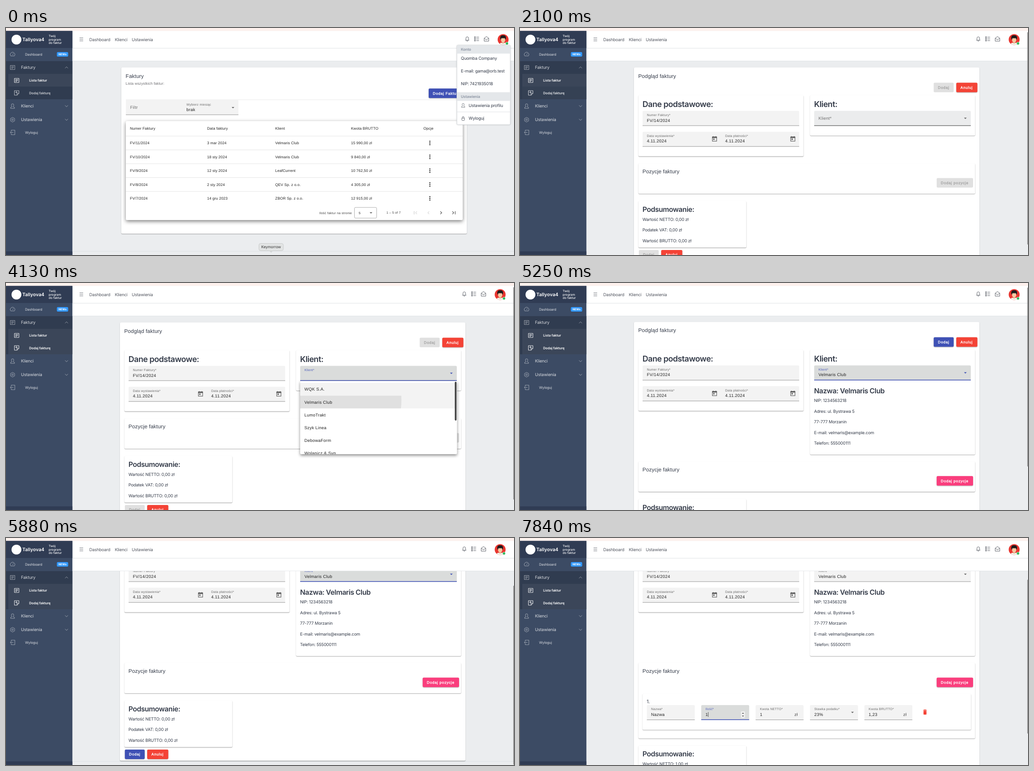
Animation, 1119 px wide and 500 px high, one loop 8 s. Source, as an HTML page with a canvas:

```html
<!DOCTYPE html>
<html lang="pl">
<head>
<meta charset="utf-8">
<title>Faktury</title>
<style>
html, body { margin: 0; width: 100%; height: 100%; overflow: hidden; background: #ebedef; }
canvas { display: block; width: 1119px; height: 500px; }
</style>
</head>
<body>
<canvas id="stage"></canvas>
<script>
const W = 1119, H = 500, LOOP = 8000;
const SIDE = 146.25, TOP = 6.5;
const canvas = document.getElementById('stage');
const c = canvas.getContext('2d');
const dpr = window.devicePixelRatio || 1;
canvas.width = W * dpr;
canvas.height = H * dpr;

const UI = "Inter, 'Noto Sans', sans-serif";
const MAT = "'Liberation Sans', Arial, sans-serif";
const BLUE = '#3f51b5', RED = '#f44336', PINK = '#fa3e7d';
const INK = '#343b49', DARK = '#212121', GREY = '#6a6a6a';

// weight, size, tracking in em, family, extra stroke
const STYLES = {
  body: [400, 9.3, -.02, UI],
  side: [400, 7.6, -.02, UI],
  sub: [600, 7.4, -.01, UI],
  slogan: [500, 6.7, 0, UI],
  brand: [600, 10.4, 0, UI],
  badge: [700, 6, 0, UI],
  menu: [600, 8.2, -.02, UI],
  tip: [400, 8.2, -.01, UI],
  h2: [600, 17.7, -.028, UI],
  h3: [600, 15.5, -.028, UI],
  title: [400, 11.7, .0125, MAT],
  caption: [400, 8.19, .007, MAT],
  cell: [400, 8.19, .018, MAT],
  page: [400, 7.02, .033, MAT],
  input: [400, 9.36, .031, MAT],
  label: [400, 7.02, .031, MAT],
  button: [400, 8.19, .089, MAT, .35]
};

const ICONS = {
  gauge: 'M-4 3.5A5 5 0 1 1 4 3.5ZM0 1L2 -2',
  doc: 'M-5 -4.5H5V4.5H-5ZM-3 -2H3M-3 0H3M-3 2H1',
  note: 'M-5 -5H5V1L1 5H-5ZM5 1H1V5M-3 -1.5H2M-.5 -4V1',
  user: 'M-2.6 -2.5A2.6 2.6 0 0 1 2.6 -2.5Q2.6 0 1.3 1.2L4.3 3V5H-4.3V3L-1.3 1.2Q-2.6 0 -2.6 -2.5Z',
  gear: 'M0 -5.2L4.5 -2.6V2.6L0 5.2L-4.5 2.6V-2.6ZM1.8 0A1.8 1.8 0 1 1 -1.8 0A1.8 1.8 0 1 1 1.8 0',
  exit: 'M-3 -2.5V-5H5V5H-3V2.5M2 0H-5M-3 -2L-5 0L-3 2',
  bell: 'M-4 3H4L2.9 1.4V-1.6A2.9 2.9 0 0 0 -2.9 -1.6V1.4ZM-1.4 3.4A1.4 1.7 0 0 0 1.4 3.4',
  list: 'M-1 -3.8H5M-1 0H5M-1 3.8H5M-5 -4.8h2v2h-2zM-5 -1h2v2h-2zM-5 2.8h2v2h-2z',
  mail: 'M-5 -1.5L0 -5.3L5 -1.5V5H-5ZM-5 -1.5L0 2L5 -1.5',
  lock: 'M-2.9 -.8H2.9V3Q2.9 4.4 1.5 4.4H-1.5Q-2.9 4.4 -2.9 3ZM-1.8 -.8V-2.6A1.8 1.8 0 0 1 1.8 -2.6V-.8',
  up: 'M-3.2 1.6L0 -1.6L3.2 1.6',
  down: 'M-3.2 -1.6L0 1.6L3.2 -1.6',
  burger: 'M-4 -3.4H4M-4 0H4M-4 3.4H4',
  next: 'M-1.7 -3L1.3 0L-1.7 3',
  prev: 'M1.7 -3L-1.3 0L1.7 3',
  last: 'M-3.2 -3L-.2 0L-3.2 3M3 -3.6V3.6',
  first: 'M3.2 -3L.2 0L3.2 3M-3 -3.6V3.6'
};

const clamp = v => Math.min(1, Math.max(0, v));
const ramp = (t, from, len) => clamp((t - from) / len);
const mix = (a, b, p) => a + (b - a) * p;
const smoother = p => p * p * p * (p * (6 * p - 15) + 10);

function text(s, x, y, style, color = INK, align = 'left', size) {
  const [weight, base, track, family, stroke] = STYLES[style];
  const px = size || base;
  c.font = `${weight} ${px}px ${family}`;
  c.letterSpacing = px * track + 'px';
  c.textAlign = align;
  c.fillStyle = color;
  c.fillText(s, x, y);
  if (stroke) {
    c.strokeStyle = color;
    c.lineWidth = stroke;
    c.strokeText(s, x, y);
  }
}

function rect(x, y, w, h, color) {
  c.fillStyle = color;
  c.fillRect(x, y, w, h);
}

function round(x, y, w, h, r, color, border) {
  c.beginPath();
  c.roundRect(x, y, w, h, r);
  if (color) { c.fillStyle = color; c.fill(); }
  if (border) { c.strokeStyle = border; c.lineWidth = .8; c.stroke(); }
}

function disc(x, y, r, color) {
  c.fillStyle = color;
  c.beginPath();
  c.arc(x, y, r, 0, 7);
  c.fill();
}

function clip(x, y, w, h, draw) {
  c.save();
  c.beginPath();
  c.rect(x, y, w, h);
  c.clip();
  draw();
  c.restore();
}

function icon(name, x, y, color, lw = .9, scale = 1) {
  c.save();
  c.translate(x, y);
  c.scale(scale, scale);
  c.strokeStyle = color;
  c.lineWidth = lw;
  c.stroke(new Path2D(ICONS[name]));
  c.restore();
}

function arrow(x, y, color = '#666', s = 1) {
  c.fillStyle = color;
  c.beginPath();
  c.moveTo(x - 3 * Math.abs(s), y - 1.5 * s);
  c.lineTo(x + 3 * Math.abs(s), y - 1.5 * s);
  c.lineTo(x, y + 1.5 * s);
  c.fill();
}

function card(x, y, right, bottom, blur = 1.6, drop = 1.1, alpha = .34) {
  c.save();
  c.shadowColor = `rgba(0,0,0,${alpha})`;
  c.shadowBlur = blur * dpr;
  c.shadowOffsetY = drop * dpr;
  round(x, y, right - x, bottom - y, 2.5, '#fff');
  c.restore();
}

function button(label, x, y, w, color) {
  if (color) {
    c.save();
    c.shadowColor = 'rgba(0,0,0,.3)';
    c.shadowBlur = 2 * dpr;
    c.shadowOffsetY = 1 * dpr;
    round(x, y, w, 21, 2.3, color);
    c.restore();
  } else {
    round(x, y, w, 21, 2.3, '#e0e0e0');
  }
  text(label, x + 9.3, y + 13.4, 'button', color ? '#fff' : '#a3a3a3');
}

// state: 0 idle, 1 hover, 2 focus; lift floats the label
function field(x, y, w, label, value = '', state = 0, lift = 1) {
  round(x, y, w, 33, [2.3, 2.3, 0, 0], ['#f3f3f3', '#ebeced', '#dadcdb'][state]);
  const line = state === 2 ? 1.5 : .9;
  rect(x, y + 33 - line, w, line, ['#8c8c8c', '#303030', BLUE][state]);
  text(label, x + 9.4, y + mix(19.5, 11.4, lift), 'label',
    state === 2 ? '#4f5fba' : GREY, 'left', mix(9.36, 7.02, lift));
  text(value, x + 9.4, y + 24, 'input', DARK);
}

function calendar(x, y) {
  c.strokeStyle = '#5c5c5c';
  c.lineWidth = 1.15;
  c.strokeRect(x - 4.7, y - 4.7, 9.4, 9.4);
  rect(x - 5.2, y - 5.2, 10.4, 2.9, '#5c5c5c');
  rect(x - 3.5, y - 6.4, 1.2, 1.4, '#5c5c5c');
  rect(x + 2.3, y - 6.4, 1.2, 1.4, '#5c5c5c');
  rect(x - 2.9, y - 1.1, 2.9, 2.9, '#5c5c5c');
}

function sidebar(t) {
  const soft = 'rgba(255,255,255,.8)', faint = 'rgba(255,255,255,.55)';
  const active = ramp(t, 1960, 300);
  rect(0, TOP, SIDE, H - TOP, '#3c4b64');
  rect(0, TOP, SIDE, 44 - TOP, '#303c54');
  rect(0, 73, SIDE, 84, '#303c50');
  rect(5, 101, SIDE - 5, 28, 'rgba(255,255,255,.05)');
  rect(5, 129, SIDE - 5, 28, `rgba(255,255,255,${.05 * active})`);
  rect(0, 492, SIDE, 8, '#303c54');

  disc(23, 25.5, 10.8, '#fff');
  text('Tallyova4', 36, 29, 'brand', '#fff');
  ['Twój', 'program', 'do faktur'].forEach((s, i) => text(s, 94, 19.7 + i * 7.8, 'slogan', '#fff'));

  icon('gauge', 14.5, 58, faint);
  text('Dashboard', 42, 60.7, 'side', soft);
  round(112, 53, 25, 10, 2.5, '#39f');
  text('NEWs', 124.5, 60.1, 'badge', '#fff', 'center');

  const groups = [['Faktury', 87, 'doc', 'up'], ['Klienci', 172, 'user', 'down'], ['Ustawienia', 202, 'gear', 'down']];
  for (const [name, y, sign, chevron] of groups) {
    icon(sign, 14.5, y, faint);
    text(name, 33, y + 3.4, 'body', soft);
    icon(chevron, 133.3, y, faint);
  }
  icon('doc', 23.5, 115.5, '#fff');
  text('Lista faktur', 51, 118, 'sub', '#fff');
  const glow = `rgba(255,255,255,${mix(.75, 1, active)})`;
  icon('note', 23.5, 143, glow);
  text('Dodaj fakturę', 51, 145.7, 'sub', glow);
  icon('exit', 14.5, 230, faint);
  text('Wyloguj', 42, 233, 'side', soft);
}

function avatar(x, y) {
  disc(x, y, 12, '#e8352f');
  c.save();
  c.beginPath();
  c.arc(x, y, 12, 0, 7);
  c.clip();
  round(x - 7.5, y + 7, 15, 8, 4, '#f3f1ea');
  rect(x - 2, y + 3, 4, 5.5, '#e5b48c');
  round(x - 6.5, y - 9.5, 13, 11, 5, '#1f1a1c');
  round(x - 4.6, y - 4.5, 9.2, 10.5, 4.4, '#f4c9a2');
  round(x - 5, y - 7, 10, 4, 2, '#1f1a1c');
  c.restore();
  disc(x + 8.5, y + 8.5, 3.2, '#fff');
  disc(x + 8.5, y + 8.5, 2.7, '#2eb85c');
}

function header(shift) {
  rect(0, 0, W, TOP, '#fef1ed');
  rect(SIDE, TOP, W - SIDE, 73 - TOP, '#fff');
  rect(SIDE, 44, W - SIDE, .8, '#d8dbe0');
  rect(SIDE, 72.4, W - SIDE, .8, '#d8dbe0');
  icon('burger', 166, 25, '#5b6069', .8);
  text('Dashboard', 183.5, 28.8, 'body', '#50545e');
  text('Klienci', 239.7, 28.8, 'body', '#50545e');
  text('Ustawienia', 277, 28.8, 'body', '#50545e');
  icon('bell', 1016 + shift, 24, '#4d525b');
  icon('list', 1037 + shift, 24, '#4d525b');
  icon('mail', 1058.3 + shift, 24, '#4d525b');
  avatar(1095 + shift, 25.5);
}

function accountMenu() {
  c.save();
  c.shadowColor = 'rgba(0,0,0,.15)';
  c.shadowBlur = 3 * dpr;
  round(993, 38, 118, 175, 2.5, '#fff', '#cfd3d8');
  c.restore();
  rect(993.4, 38.4, 117.2, 18, '#e4e7ea');
  rect(993.4, 141.5, 117.2, 19, '#e4e7ea');
  text('Konto', 1002, 50, 'menu', '#8a93a2');
  text('Quomba Company', 1002, 69.8, 'body');
  text('E-mail: gama@orb.test', 1002, 98.2, 'body');
  text('NIP: 7421935018', 1002, 126.4, 'body');
  text('Ustawienia', 1002, 154, 'menu', '#8a93a2');
  icon('user', 1007, 170.5, '#565c66', .9, .85);
  text('Ustawienia profilu', 1019, 173.9, 'body');
  rect(993.4, 184.5, 117.2, .8, '#d8dbe0');
  icon('lock', 1007, 199.3, '#565c66', .9);
  text('Wyloguj', 1019, 202.4, 'body');
}

const COLUMNS = [273, 443, 593, 760, 919.5];
const ROWS = [
  ['FV/11/2024', '3 mar 2024', 'Velmaris Club', '15 990,00 zł'],
  ['FV/10/2024', '18 sty 2024', 'Velmaris Club', '9 840,00 zł'],
  ['FV/9/2024', '12 sty 2024', 'LeafCurrent', '10 762,50 zł'],
  ['FV/8/2024', '2 sty 2024', 'QEV Sp. z o.o.', '4 305,00 zł'],
  ['FV/7/2024', '14 gru 2023', 'ZBOR Sp. z o.o.', '12 915,00 zł']
];

function listPage(t) {
  rect(SIDE, 491.5, W - SIDE, .8, '#d8dbe0');
  card(254, 87, 1015, 453);
  text('Faktury', 263.6, 109.5, 'title', INK);
  text('Lista wszystkich faktur:', 263.6, 125.2, 'caption', '#6f6f73');
  button('Dodaj Fakturę', 931, 133.3, 82, t < 1540 ? BLUE : '#4859b9');
  if (t >= 1680) rect(932, 155, 62, 1.8, 'rgba(0,0,0,.16)');

  rect(264, 157.6, 742, .9, '#e6e6e6');
  field(264, 158.5, 248, 'Filtr', '', 0, 0);
  text('Wybierz miesiąc', 397.5, 170.5, 'label', GREY);
  text('brak', 397.5, 183.2, 'input', DARK);
  arrow(500, 175.5);

  card(264, 205, 1006, 423, 8, 3, .5);
  ['Numer Faktury', 'Data faktury', 'Klient', 'Kwota BRUTTO', 'Opcje']
    .forEach((s, i) => text(s, COLUMNS[i], 224.2, 'cell', DARK));
  ROWS.forEach((row, r) => {
    const y = 253.2 + r * 30.5;
    rect(264, y - 15.6, 742, .8, '#dedede');
    row.forEach((s, i) => text(s, COLUMNS[i], y + 2.8, 'cell', DARK));
    for (let k = -1; k <= 1; k++) disc(933.7, y + k * 3.7, 1.25, '#222');
  });

  text('Ilość faktur na stronie', 690, 409.6, 'page', '#404040');
  round(767.5, 395.2, 49, 23.6, 2.5, null, '#9a9a9a');
  text('5', 777, 409.8, 'page', DARK);
  arrow(804, 407.3);
  text('1 – 5 of 7', 838, 409.4, 'page', '#404040');
  icon('first', 902, 407, '#c2c2c2', 1);
  icon('prev', 930.5, 407, '#c2c2c2', 1);
  icon('next', 958.5, 407, '#555', 1.2);
  icon('last', 986.5, 407, '#555', 1.2);
}

function tooltip(alpha) {
  c.save();
  c.globalAlpha = alpha;
  round(557, 474.5, 54, 16, 4, '#e2e4e4', '#c3c6c6');
  arrow(584, 492.5, '#d3d6d6', 1.6);
  text('Keymorrow', 584, 485.4, 'tip', '#333', 'center');
  c.restore();
}

const CLIENTS = ['WQK S.A.', 'Velmaris Club', 'LumoTrakt', 'Szyk Linea', 'DebowaForm', 'Wolanicz & Syn'];

function clientPanel(t) {
  const open = ramp(t, 3110, 130), shut = ramp(t, 4180, 120);
  if (!open || shut === 1) return;
  c.save();
  c.globalAlpha = open * (1 - shut);
  c.translate(0, 216);
  c.scale(1, mix(.8, 1, open));
  c.translate(0, -216);
  card(648, 216, 993.5, 377, 6, 3, .45);
  clip(648, 216, 345.5, 161, () => {
    rect(648, 220, 345.5, 56.2, '#f3f3f3');
    if (t >= 4130) clip(648, 248.2, 345.5, 28, () => disc(700, 257, 170 + (t - 4130), '#e0e0e0'));
    CLIENTS.forEach((s, i) => text(s, 657.3, 237.4 + i * 28.15, 'input', DARK));
    round(988.6, 217.5, 3.8, 85.5, 1.9, '#444');
  });
  c.restore();
}

function invoiceItem(t) {
  const y = 487;
  card(270, 462, 993.5, 541.5);
  text('1.', 279, 482.7, 'body', INK, 'left', 10.6);
  const qty = t >= 7700 ? 2 : t >= 7350 ? 1 : 0;
  const net = t >= 7210 && t < 7350 ? 1 : 0;
  const fields = [['Nazwa*', 'Nazwa', 0], ['Ilość*', '1', qty], ['Kwota NETTO*', '1', net],
    ['Stawka podatku*', '23%', 0], ['Kwota BRUTTO*', '1,23', 0]];
  fields.forEach(([label, value, state], i) => field(279.4 + i * 119.8, y, 105.6, label, value, state));
  text('zł', 604.5, y + 24, 'input', '#444');
  text('zł', 844.2, y + 24, 'input', '#444');
  arrow(732.3, y + 16.3);
  if (qty) {
    round(486.6, y + 13.8, 9, 14.4, 1.5, '#efefef');
    arrow(491.1, y + 17.8, '#444', -.75);
    arrow(491.1, y + 24.4, '#444', .75);
  }
  if (qty === 2) rect(414.3, y + 15.5, .8, 10.5, '#333');
  rect(888.2, y + 10.6, 7.8, 1.3, RED);
  rect(890.4, y + 9.8, 3.4, 1.2, RED);
  round(888.8, y + 12.6, 6.6, 8.4, 1, RED);
}

function formPage(t) {
  const picked = t >= 4200, added = t >= 6510;
  const grow = picked ? 96 : 0, extra = added ? 99.5 : 0;
  const scroll = 119 * smoother(ramp(t, 5180, 700));
  const bottom = 513.6 + grow + extra;
  const focus = t >= 3150 && t < 6440;
  const main = picked ? BLUE : null;

  clip(SIDE, 73, W - SIDE, H - 73, () => {
    c.translate(0, -scroll);
    rect(SIDE, bottom + 1, W - SIDE, .8, '#d8dbe0');
    card(251, 87, 1012, bottom);
    text('Podgląd faktury', 260.4, 109.5, 'title');
    button('Dodaj', 911.3, 120.5, 44, main);
    button('Anuluj', 961, 120.5, 46.5, RED);

    card(261, 148, 624.5, 282.6);
    text('Dane podstawowe:', 269.7, 173.8, 'h2');
    field(270, 182.5, 345, 'Numer Faktury*', 'FV/14/2024');
    field(270, 228.4, 345, 'Data wystawienia*', '4.11.2024');
    text('Data płatności*', 452, 239.8, 'label', GREY);
    text('4.11.2024', 452, 252.4, 'input', DARK);
    calendar(428.5, 244.6);
    calendar(601, 244.6);

    card(639, 148, 1002.5, picked ? 379 : 237);
    text('Klient:', 647.7, 173.8, 'h2');
    const state = focus ? 2 : t < 3150 ? 1 : 0;
    field(648, 182.5, 345, 'Klient*', picked ? 'Velmaris Club' : '', state, ramp(t, 3130, 150));
    if (t < 2870) rect(648, 214.6, 345, .9, '#8c8c8c');
    arrow(981, 199, focus ? BLUE : '#666');
    if (picked) {
      text('Nazwa: Velmaris Club', 647.7, 244.1, 'h3');
      ['NIP: 1234563218', 'Adres: ul. Bystrawa 5', '77-777 Morzanin', 'E-mail: velmaris@example.com', 'Telefon: 555000111']
        .forEach((s, i) => text(s, 647.7, 263.4 + i * 23.5, 'body'));
    }

    c.translate(0, grow);
    card(261, 298, 1002.5, 364.9 + extra);
    text('Pozycje faktury', 269.7, 319.9, 'title');
    button('Dodaj pozycje', 917.8, 330.4, 80.2, picked ? PINK : null);
    if (t >= 6440 && t < 6790) {
      clip(918, 330.4, 80, 21, () =>
        disc(958, 341, 10 + (t - 6440) * .2, `rgba(255,255,255,${.2 * (1 - ramp(t, 6580, 210))})`));
    }
    c.translate(0, -grow);
    if (added) invoiceItem(t);

    c.translate(0, grow + extra);
    card(261, 381, 498.5, 483.6);
    text('Podsumowanie:', 269.7, 404.9, 'h3');
    const sums = added ? ['1,00', '0,23', '1,23'] : ['0,00', '0,00', '0,00'];
    ['Wartość NETTO', 'Podatek VAT', 'Wartość BRUTTO']
      .forEach((s, i) => text(`${s}: ${sums[i]} zł`, 269.7, 424.5 + i * 23.5, 'body'));
    button('Dodaj', 261.8, 488.9, 43.7, main);
    button('Anuluj', 311, 488.9, 46.5, RED);
  });

  const ratio = 493 / (493 + 23 + grow + extra);
  round(1117.6, 9 + scroll * ratio, 3, 490 * ratio, 1.5, '#808080');
  clientPanel(t);
}

function draw(t) {
  const form = t >= 1960;
  c.setTransform(dpr, 0, 0, dpr, 0, 0);
  c.textBaseline = 'alphabetic';
  c.textRendering = 'geometricPrecision';
  rect(0, 0, W, H, '#ebedef');
  header(form ? -6.5 : 0);
  sidebar(t);
  if (form) {
    formPage(t);
  } else {
    listPage(t);
    accountMenu();
    const fade = 1 - ramp(t, 140, 210);
    if (fade) tooltip(fade);
  }
}

const start = performance.now();
function frame() {
  draw((performance.now() - start) % LOOP);
  requestAnimationFrame(frame);
}
frame();
</script>
</body>
</html>
```
